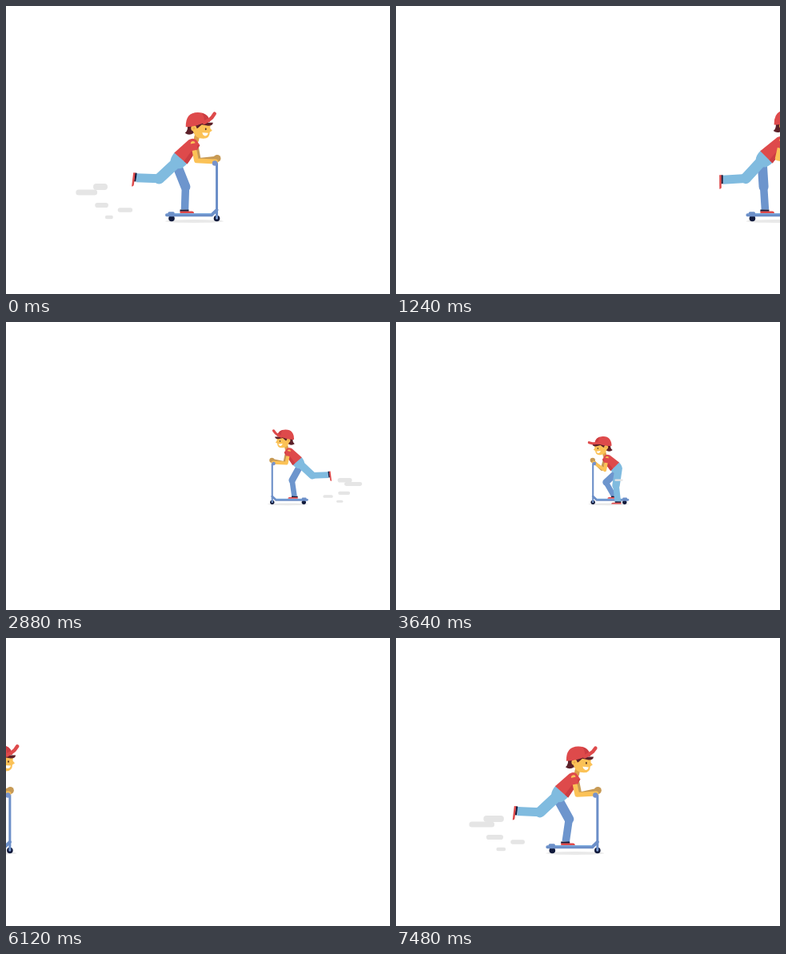
Recreate the animation shown at these times as an HTML page with a canvas. Size 480 by 360 pixels, loop 7520 ms.

```html
<!DOCTYPE html>
<html>
<head>
<meta charset="utf-8">
<style>
html, body { margin: 0; width: 100%; height: 100%; overflow: hidden; background: #fff; }
canvas { display: block; }
</style>
</head>
<body>
<canvas id="stage" width="480" height="360"></canvas>
<script>
const ctx = document.getElementById('stage').getContext('2d');
const { sin, cos, PI, hypot, atan2, sqrt, floor, min, max } = Math;
const LOOP = 7520, CYCLE = 960, STRIDE = 175.7, FRONT = 263.5;

const SKIN = '#fbc257', SKIN_DARK = '#c79a55', RED = '#de4a4b', RED_DARK = '#cc3d42';
const JEANS = '#80bbdf', JEANS_DARK = '#6d95cd', STEEL = '#6c8fc8', NAVY = '#111a3c', HAIR = '#5b2029';

// Where each dust streak comes to rest, from top to bottom
const DUST = [[109, 226], [85, 233], [111, 249], [136, 255], [123, 264]];

const clamp = u => min(1, max(0, u));
const smooth = u => clamp(u) ** 2 * (3 - 2 * clamp(u));

// Steady travel plus the surge of every kick
function distance(time) {
  const a = 2 * PI * time / CYCLE;
  return STRIDE * time / CYCLE + 15.6 * sin(a) - 2.6 * (1 - cos(2 * a)) + 1 - cos(a);
}

function poseAt(phase) {
  const a = 2 * PI * phase / CYCLE;
  const crouch = ((1 + cos(a - 4.8)) / 2) ** 3;
  const swing = smooth((phase - 720) / 190) + 1 - smooth((phase - 200) / 480);
  const lean = 5 - 6.5 * cos(a + 0.26), drop = 17.5 * crouch - 3;
  const hip = [213 + 0.65 * lean + 3 * crouch, 194 + 13 * crouch];
  const reach = 57 - 3 * swing, angle = 1.22 * swing;
  return {
    lean, drop, hip, swing,
    bill: 37 * crouch ** 2,
    foot: [hip[0] + 1 - reach * sin(angle), hip[1] + reach * cos(angle)],
    farFoot: [223 + 3 * crouch, 254.5],
    shoulder: [235 + lean, 172 + drop]
  };
}

// Middle joint of a two-bone limb
function joint([ax, ay], [bx, by], l1, l2, side) {
  const dx = bx - ax, dy = by - ay, d = hypot(dx, dy);
  const along = (l1 * l1 - l2 * l2 + d * d) / (2 * d);
  const off = side * sqrt(max(0, l1 * l1 - along * along));
  return [ax + (dx * along + dy * off) / d, ay + (dy * along - dx * off) / d];
}

function line(color, width, points, cap = 'round') {
  ctx.strokeStyle = color;
  ctx.lineWidth = width;
  ctx.lineCap = cap;
  ctx.lineJoin = 'round';
  ctx.beginPath();
  points.forEach(p => ctx.lineTo(...p));
  ctx.stroke();
}

function shape(color, path) {
  ctx.fillStyle = color;
  ctx.fill(new Path2D(path));
}

function oval(color, x, y, rx, ry = rx) {
  ctx.fillStyle = color;
  ctx.beginPath();
  ctx.ellipse(x, y, rx, ry, 0, 0, 7);
  ctx.fill();
}

function placed(x, y, angle, draw) {
  ctx.save();
  ctx.translate(x, y);
  ctx.rotate(angle);
  draw();
  ctx.restore();
}

function leg(color, hip, foot, width, footAngle) {
  const knee = joint(hip, foot, 29, 28.5, 1);
  line(color, width, [hip, knee]);
  line(color, width - 2.5, [hip, knee, foot], 'butt');
  placed(...foot, footAngle, () => {
    shape(NAVY, 'M-6 0H5V2.4H-6Z');
    shape(RED, 'M-6 2H9Q11.5 2 11.5 4.5H-6Z');
  });
}

function scooter() {
  oval('#e9e9e9', 235.5, 269, 36.5, 2);
  for (const x of [207, FRONT]) oval(NAVY, x, 265.5, 3.8);
  line(STEEL, 4, [[201, 261.2], [257, 261.2], [FRONT, 255]]);
  line('#7faee0', 1.2, [[202, 259.6], [256, 259.6]]);
  line(STEEL, 3.4, [[204, 259], [209, 259]]);
  line(STEEL, 3, [[FRONT, 196], [FRONT, 265]]);
  oval('#8fa9d8', FRONT, 265.5, 1.1);
}

function head({ lean, drop, bill }) {
  const tilt = bill * PI / 180;
  placed(240 + lean, 160 + drop, tilt / 8, () => {
    ctx.translate(-240, -160);
    shape(HAIR, 'M228 150Q229 156 225 159Q230 163 236 159L240 148Z');
    shape(SKIN, 'M235 147H257L256.5 153L259 156L256 158Q256 166 248 166Q238 166 235 157Z');
    shape(HAIR, 'M239 146H260Q260 150 254 150L246 148.5L241 153H237Z');
    oval(SKIN, 236, 153, 3.5);
    oval('#eda94a', 236.3, 153.2, 1.5);
    oval('#4a2a24', 251, 154, 0.9, 1.3);
    shape('#fff', 'M246.5 158.5L254 159Q253 163 249.5 162.5Q247 161.5 246.5 158.5Z');
    shape(RED, 'M226 151.5Q225.5 133.3 241 133.3Q254 133.3 256 145Q246 147 240 149.5Q233 151.5 226 151.5Z');
    shape(RED_DARK, 'M246 134Q254.5 136 256 145L249 146.5Q250 139 246 134Z');
    placed(252, 144.5, tilt, () => line(RED, 4.4, [[-3, 1.5], [3, -2], [6.5, -5], [9.8, -10]]));
  });
}

function rider(pose) {
  const { hip, shoulder, foot, farFoot, swing } = pose;
  const [sx, sy] = shoulder, [hx, hy] = hip;
  const hand = [262, 194.5], farHand = [265, 190], farShoulder = [sx + 4, sy + 1];
  const elbow = joint(shoulder, hand, 22, 24, -1);

  line(SKIN_DARK, 5, [farShoulder, joint(farShoulder, farHand, 20, 24, -1), farHand]);
  scooter();
  leg(JEANS_DARK, [hx + 1, hy + 3], farFoot, 12, 0);
  leg(JEANS, hip, foot, 13.5, 1.69 * swing);

  line('#dfa04b', 6.5, [[sx + 4, sy - 4], [sx + 5, sy - 9]]);
  const length = hypot(sx - hx, sy - hy);
  placed(hx, hy, atan2(sy - hy, sx - hx), () => {
    shape(JEANS, 'M-4 -6Q0 -10 9 -10V11Q-2 11 -4 6Z');
    shape(RED, `M8 -10L${length} -7Q${length + 6} -5 ${length + 6} 0L${length + 4} 8L8 11.5Z`);
    shape(RED_DARK, `M${length + 4} 8L8 11.5V6L${length} 4Z`);
  });
  head(pose);

  oval(SKIN_DARK, 264, 190.5, 4.5);
  line(SKIN, 5.8, [shoulder, elbow, hand]);
  line(RED, 9, [shoulder, shoulder.map((v, i) => v * 0.6 + elbow[i] * 0.4)], 'butt');
  oval('#7793cb', 261, 196.5, 3.2);
}

// Streaks shoot back from the kicking foot, then their tails catch up
function dust(age) {
  ctx.fillStyle = '#e5e5e5';
  DUST.forEach(([x, y], i) => {
    const time = age - 680 - 20 * i - 60 * (i % 2);
    const offset = u => (52 - 9 * i) * (1 - clamp(u)) ** 2;
    const left = offset(time / 260), width = offset((time - 140) / 340) - left;
    if (width < 1) return;
    const height = min((8 - 0.9 * i) * clamp(time / 100), width);
    ctx.beginPath();
    ctx.roundRect(x + left, y - height / 2, width, height, height / 2);
    ctx.fill();
  });
}

function ride(time) {
  const turn = floor(time / CYCLE);
  placed(distance(time), 0, 0, () => rider(poseAt(time - turn * CYCLE)));
  for (const n of [turn - 1, turn]) {
    placed(STRIDE * (n + 1), 0, 0, () => dust(time - n * CYCLE));
  }
}

function draw(t) {
  ctx.clearRect(0, 0, 480, 360);
  if (t >= 1800 && t < 6100) {
    placed(78.6, 225, 0, () => {
      ctx.scale(-0.7, 0.7);
      ctx.translate(-FRONT, -265);
      ride(t - 4840);
    });
  }
  if (t < 1680) ride(t);
  else if (t > 5900) ride(t - LOOP);
}

const start = performance.now();
function tick() {
  const t = (performance.now() - start) % LOOP;
  draw(floor(t / 40) * 40);
  requestAnimationFrame(tick);
}
tick();
</script>
</body>
</html>
```
